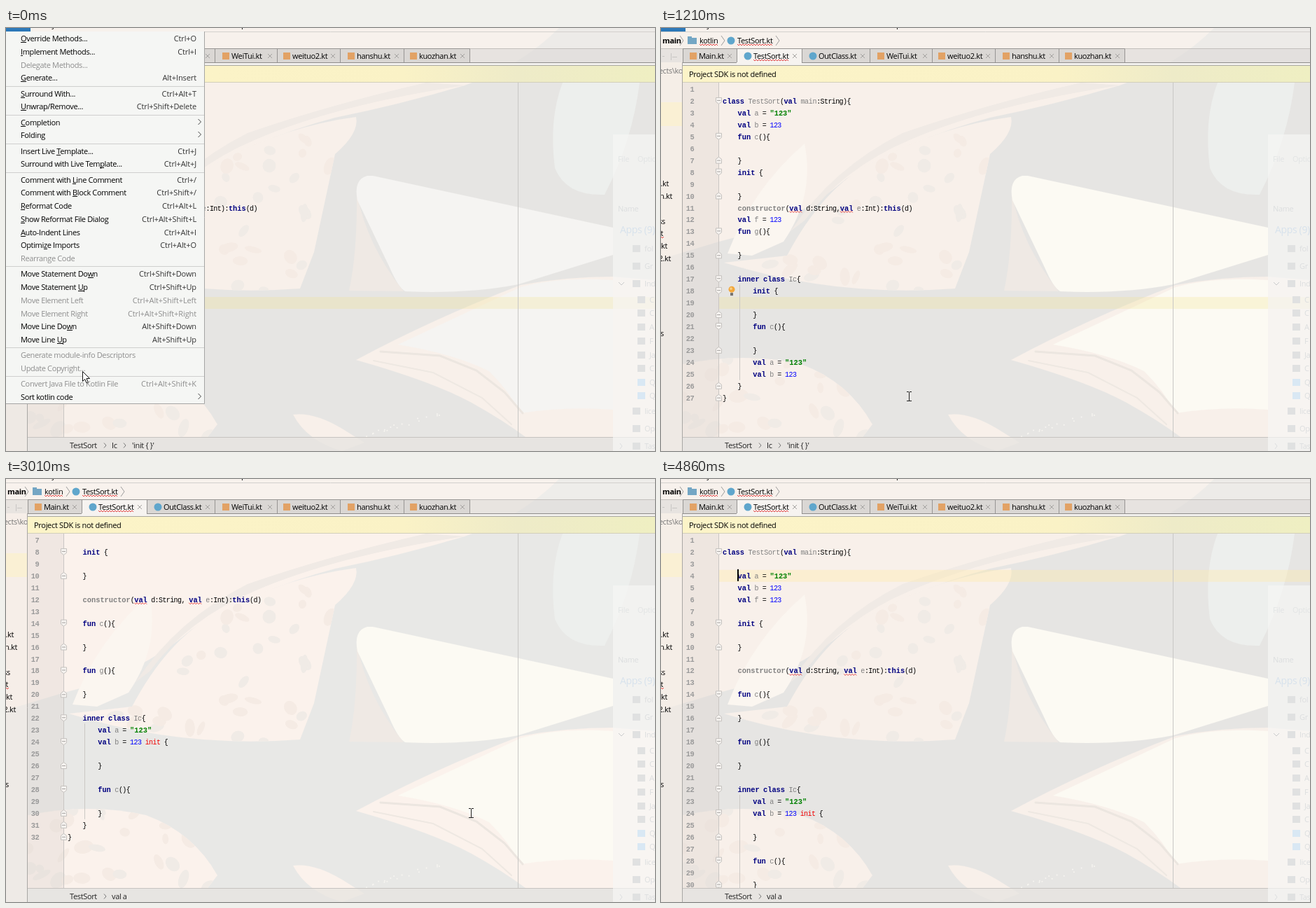
These frames come from a looping animation (927 px wide and 604 px high, 4960 ms). An HTML page with a canvas:

```html
<!DOCTYPE html>
<html lang="en">
<head>
<meta charset="utf-8">
<title>Sorting Kotlin code</title>
<style>
html, body { margin: 0; width: 100%; height: 100%; overflow: hidden; }
canvas { display: block; }
</style>
</head>
<body>
<canvas id="stage" width="927" height="604"></canvas>
<script>
const ctx = document.getElementById('stage').getContext('2d');
const LOOP = 4960;
const STEPS = [0, 130, 250, 370, 490, 610, 730, 850, 970, 1090, 1210, 1450, 1570, 1690, 1810, 1930,
  2050, 2170, 2290, 2410, 2540, 2650, 2770, 2890, 3010, 3380, 3880, 4000, 4120, 4240, 4360, 4860];
const SELECT = 250, CLOSE = 850, SORT = 1450, BULB = 2170, SCROLL = 2650, RESET = 3380;
const ROW = 16.95, TOP = 87;

// Pointer path: time, x, y
const PATH = [[0, 109, 490], [130, 109, 501], [250, 113, 518], [370, 150, 524], [490, 226, 526],
  [610, 298, 527], [730, 326, 527], [850, 332, 533], [1210, 354, 526], [1450, 390, 525],
  [1930, 650, 522], [2290, 705, 539], [2650, 690, 510], [3010, 664, 477], [3380, 678, 498],
  [3880, 678, 498], [4360, 816, 616], [4960, 816, 616]];

const BEFORE = `
class TestSort(val main:String){
    val a = "123"
    val b = 123
    fun c(){

    }
    init {

    }
    constructor(val d:String,val e:Int):this(d)
    val f = 123
    fun g(){

    }

    inner class Ic{
        init {

        }
        fun c(){

        }
        val a = "123"
        val b = 123
    }
}`.split('\n');

const AFTER = `
class TestSort(val main:String){

    val a = "123"
    val b = 123
    val f = 123

    init {

    }

    constructor(val d:String, val e:Int):this(d)

    fun c(){

    }

    fun g(){

    }

    inner class Ic{
        val a = "123"
        val b = 123 init {

        }

        fun c(){

        }
    }
}`.split('\n');

// "&" marks the mnemonic, a leading "-" a disabled entry
const MENU = [
  ['&Override Methods...|Ctrl+O', '&Implement Methods...|Ctrl+I', '-Delegate Methods...', '&Generate...|Alt+Insert'],
  ['&Surround With...|Ctrl+Alt+T', '&Unwrap/Remove...|Ctrl+Shift+Delete'],
  ['&Completion|>', 'Folding|>'],
  ['Insert Live &Template...|Ctrl+J', 'Surround with Live Tem&plate...|Ctrl+Alt+J'],
  ['Comment with &Line Comment|Ctrl+/', 'Comment with &Block Comment|Ctrl+Shift+/', '&Reformat Code|Ctrl+Alt+L',
    '&Show Reformat File Dialog|Ctrl+Alt+Shift+L', '&Auto-Indent Lines|Ctrl+Alt+I', 'Optimi&ze Imports|Ctrl+Alt+O', '-Rearrange Code'],
  ['Move Statement Do&wn|Ctrl+Shift+Down', 'Move Statement &Up|Ctrl+Shift+Up', '-Move Element Left|Ctrl+Alt+Shift+Left',
    '-Move Element Right|Ctrl+Alt+Shift+Right', 'Move Line Do&wn|Alt+Shift+Down', 'Move Line &Up|Alt+Shift+Up'],
  ['-Generate module-info Descriptors', '-Update Copyright...'],
  ['-Convert Java File to Kotlin File|Ctrl+Alt+Shift+K', 'Sort kotlin code|>']
];

function rect(x, y, w, h, color) {
  ctx.fillStyle = color;
  ctx.fillRect(x, y, w, h);
}

function line(color, width, ...pts) {
  ctx.strokeStyle = color;
  ctx.lineWidth = width;
  ctx.beginPath();
  for (let i = 0; i < pts.length; i += 2) ctx.lineTo(pts[i], pts[i + 1]);
  ctx.stroke();
}

function shape(color, path) {
  ctx.fillStyle = color;
  ctx.fill(new Path2D(path));
}

function dot(x, y, r, color) {
  ctx.fillStyle = color;
  ctx.beginPath();
  ctx.arc(x, y, r, 0, 7);
  ctx.fill();
}

function label(str, x, y, color = '#000', { size = 11, weight = '', gap = -0.35, align = 'left' } = {}) {
  ctx.font = `${weight} ${size}px "Open Sans", sans-serif`;
  ctx.letterSpacing = gap + 'px';
  ctx.textAlign = align;
  ctx.fillStyle = color;
  ctx.fillText(str, x, y + 4);
  return ctx.measureText(str).width;
}

function wave(x, y, w) {
  ctx.strokeStyle = '#e03030';
  ctx.lineWidth = 0.9;
  ctx.beginPath();
  for (let i = 0; i <= w; i += 2) ctx.lineTo(x + i, y + (i % 4 ? 1 : -1));
  ctx.stroke();
}

function chevron(x, y, w, h, color) {
  line(color, 1, x, y - h, x + w, y, x, y + h);
}

function seeded(seed) {
  return () => (seed = (seed * 16807) % 2147483647) / 2147483647;
}

const SPECKLED = 'M180 325Q230 230 300 192Q400 140 500 127Q505 150 470 180Q455 250 440 320L420 372Q250 385 90 335Z';
const CRUST = 'M31 480Q120 462 200 480Q268 505 302 566L288 584H31Z';

function speckle(path, x, y, w, h, count, seed) {
  const rnd = seeded(seed);
  ctx.save();
  ctx.clip(new Path2D(path));
  for (let i = 0; i < count; i++) {
    ctx.fillStyle = i % 2 ? '#f0ebe6' : '#f5ebe4';
    ctx.beginPath();
    ctx.ellipse(x + rnd() * w, y + rnd() * h, 5 + rnd() * 9, 4 + rnd() * 6, rnd() * 3, 0, 7);
    ctx.fill();
  }
  ctx.restore();
}

function wallpaper(t) {
  const warm = t >= CLOSE, scrolled = t >= SCROLL && t < RESET;
  const peach = scrolled ? '#fbf2ec' : '#f8f0ea';
  const cream = warm ? '#fcfaf3' : '#f5f4f2';
  rect(0, 0, 927, 604, scrolled ? '#e8e8e6' : '#e6e5e3');
  shape(peach, 'M0 0H790Q735 55 655 82Q560 110 470 128Q350 160 265 215Q190 280 83 305L0 330Z');
  shape('#f0eae5', 'M655 82Q470 110 355 160Q260 200 205 275L185 290Q245 200 345 150Q460 110 600 78Z');
  shape(peach, SPECKLED);
  speckle(SPECKLED, 90, 130, 410, 245, 60, 71);
  shape(warm ? '#fbf6f0' : '#f5f2ee', 'M95 322Q130 230 205 165Q220 240 175 305L130 325Z');
  shape(peach, CRUST);
  speckle(CRUST, 31, 470, 270, 115, 30, 19);
  shape('#edefed', 'M795 78H905Q895 160 855 238Q800 240 784 200Q775 130 795 78Z');
  shape('#efe9e4', 'M501 235Q515 310 568 376L490 375Q502 320 501 235Z');
  shape(cream, 'M524 211L867 285V324L732 366Q660 380 570 376Q560 370 548 342L502 246Q496 216 516 211Z');
  shape(peach, 'M867 355Q800 355 735 367Q610 415 500 474Q610 505 665 535Q710 560 742 584H927V360Z');
  shape(cream, 'M867 360Q790 355 735 370Q650 410 560 452Q640 465 690 490Q720 520 735 550Q800 540 867 545Z');
  ctx.lineCap = 'round';
  line('#ece6e0', 3, 535, 462, 620, 468, 672, 489, 712, 520, 738, 550);
  line('#eee8e2', 2, 525, 475, 610, 492, 680, 528, 722, 566);
  ctx.lineCap = 'butt';
  shape(peach, 'M410 552Q440 548 480 572L512 592L480 604Q430 590 410 552Z');
  const rnd = seeded(5);
  for (let i = 0; i < 18; i++) {
    const u = rnd();
    dot(515 + u * 110, 578 - u * 32 + rnd() * 8, 1, '#f7f5f1');
  }
}

function ghostWindow() {
  rect(867, 152, 60, 452, 'rgba(247,247,246,.7)');
  const faint = '#dcdedf';
  label('File', 874, 187, '#e2e4e4');
  label('Options', 902, 187, '#e2e4e4');
  label('Name', 874, 258, faint);
  label('Apps (9)', 877, 289, '#d7e2ec', { size: 14 });
  line('#c8cacb', 1, 875, 363, 879, 367, 883, 363);
  chevron(877, 597, 3, 4, faint);
  const rows = [[315, 'fol'], [340, 'Gr'], [365, 'Ind'], [388, 'C'], [407, 'C'], [427, 'A'], [447, 'F'],
    [467, 'Ja'], [486, 'C'], [506, 'Q'], [525, 'Q'], [547, 'lice'], [572, 'Op'], [597, 'Tas']];
  for (const [y, name] of rows) {
    const inner = y > 380 && y < 540;
    const color = y === 506 || y === 525 ? '#d9e8f4' : '#e0e1e1';
    rect(inner ? 902 : 895, y - 5, 11, 10, color);
    label(name, inner ? 919 : 912, y, faint);
  }
}

function tab(name, x, end, textX, kind) {
  const active = name === 'TestSort.kt';
  rect(x, 30, end - x, active ? 23 : 19, active ? '#f6f3f0' : '#dad7d4');
  line('#979593', 1, x + 0.5, 49, x + 0.5, 29.5, end + 0.5, 29.5, end + 0.5, 49);
  if (kind === 'class') dot(textX - 8, 40, 5.5, '#5fa6cc');
  else rect(textX - 13, 35, 10, 10, '#e2a265');
  const w = label(name, textX, 40);
  if (active) wave(textX, 46, w);
  line('#a3a19f', 1, end - 13, 37, end - 7, 43);
  line('#a3a19f', 1, end - 7, 37, end - 13, 43);
}

function frameTop(t) {
  rect(0, 0, 927, 29, 'rgba(244,241,237,.45)');
  const names = [['Analyze', 44], ['Refactor', 93], ['Build', 144], ['Run', 178], ['Tools', 209], ['VCS', 245], ['Window', 276], ['Help', 320]];
  for (const [name, x] of names) label(name, x, -5);
  if (t < SORT) {
    rect(0, 0, 35, 5, '#2c78b8');
    label('Code', 6, -4, '#fff');
  }
  line('#d3d0cd', 1, 0, 5.5, 927, 5.5);
  label('main', 2, 18, '#000', { weight: 'bold' });
  chevron(27, 18, 5, 7, '#9b9b9b');
  rect(38, 14, 13, 9, '#74a6c4');
  rect(38, 12, 6, 3, '#74a6c4');
  wave(55, 24, label('kotlin', 55, 18));
  chevron(86, 18, 5, 7, '#9b9b9b');
  dot(100, 18, 5.5, '#5fa6cc');
  wave(109, 24, label('TestSort.kt', 109, 18));
  chevron(164, 18, 5, 7, '#9b9b9b');

  rect(0, 29, 927, 20, 'rgba(226,223,220,.75)');
  line('#c2bfbc', 1, 0, 29.5, 927, 29.5);
  rect(31, 49, 896, 4, '#f3f1ee');
  line('#8f8d8b', 1, 31, 49.5, 927, 49.5);
  tab('Main.kt', 31, 108, 54);
  tab('OutClass.kt', 201, 298, 225, 'class');
  tab('WeiTui.kt', 298, 387, 322);
  tab('weituo2.kt', 387, 477, 409);
  tab('hanshu.kt', 477, 568, 501);
  tab('kuozhan.kt', 568, 662, 590);
  tab('TestSort.kt', 108, 201, 132, 'class');
  line('#a9a8a0', 1, 31, 53.5, 927, 53.5);
  const g = ctx.createLinearGradient(31, 0, 927, 0);
  g.addColorStop(0, '#fcf4c8');
  g.addColorStop(0.6, '#faf2c6');
  g.addColorStop(0.78, '#eeebc8');
  g.addColorStop(1, '#efefc2');
  rect(31, 54, 896, 23, g);
  line('#d2cfbb', 1, 31, 77.5, 927, 77.5);
  label('Project SDK is not defined', 40, 66, '#000', { gap: -0.3 });
}

function sidePanel() {
  rect(0, 49, 31, 555, 'rgba(243,237,231,.6)');
  rect(0, 106, 30, 34, '#faf0d4');
  line('#777', 1, 2, 40.5, 5, 40.5);
  line('#777', 1, 14.5, 36, 14.5, 46);
  line('#777', 1, 16, 41.5, 23, 41.5);
  label('ects\\ko', 31, 61, '#777', { align: 'right' });
  for (const [str, right, y] of [['.kt', 11, 222], ['n.kt', 16, 240], ['ss', 6, 276], ['rt', 3, 293], ['.kt', 9, 311], ['2.kt', 14, 329], ['s', 4, 436]])
    label(str, right, y, '#000', { align: 'right' });
  wave(0, 299, 4);
  line('#a9a7a4', 1, 30.5, 49, 30.5, 604);
}

// Draws monospaced text and returns the x where it ends
function mono(str, x, y, color, bold, pitch = bold ? 6.2 : 5.4) {
  const size = bold ? 10.4 : 10;
  ctx.font = `${bold ? 'bold' : ''} ${size}px "Liberation Mono", monospace`;
  ctx.letterSpacing = (pitch - size * 0.6) + 'px';
  ctx.textAlign = 'left';
  ctx.fillStyle = color;
  ctx.fillText(str, x, y + 4);
  return x + str.length * pitch;
}

function codeLine(str, y) {
  let x = 88;
  for (const token of str.match(/"[^"]*"|\w+|./g) || []) {
    const start = x, stray = token === 'init' && /123/.test(str);
    let color = '#000', bold = false, pitch;
    if (stray) color = '#f00000';
    else if (/^(class|val|fun|init|this|inner)$/.test(token)) [color, bold] = ['#000080', true];
    else if (token === 'constructor') [color, bold] = ['#808080', true];
    else if (token[0] === '"') [color, bold] = ['#008000', true];
    else if (/^\d/.test(token)) color = '#0000ff';
    else if (/^(TestSort|main|Ic|[abcefg])$/.test(token)) [color, pitch] = ['#808080', 5.7];
    x = mono(token, x, y, color, bold, pitch);
    if (token === 'val' && /constructor/.test(str)) wave(start, y + 6, 19);
  }
}

function foldMark(y, open) {
  const d = open ? 1 : -1;
  ctx.fillStyle = '#f6f3f0';
  ctx.beginPath();
  for (const [dx, dy] of [[-4, -4.5], [4, -4.5], [4, 1.5], [0, 4.5], [-4, 1.5]]) ctx.lineTo(82.5 + dx, y + dy * d);
  ctx.closePath();
  ctx.fill();
  ctx.strokeStyle = '#c4c1be';
  ctx.lineWidth = 1;
  ctx.stroke();
  line('#a5a2a0', 1, 80, y - d * 0.5, 85, y - d * 0.5);
}

function bulb(y) {
  dot(101, y - 2, 4.5, '#f2a73c');
  dot(100, y - 3, 1.8, '#f9cf85');
  rect(99, y + 3, 4, 4, '#77736e');
}

function editor(t) {
  const sorted = t >= SORT, code = sorted ? AFTER : BEFORE;
  const scroll = t >= SCROLL && t < RESET ? 6 * Math.min(1, (t - 2530) / 480) : 0;
  const rowY = n => TOP + (n - 1 - scroll) * ROW;
  ctx.save();
  ctx.beginPath();
  ctx.rect(31, 78, 896, 506);
  ctx.clip();
  rect(31, 78, 52, 506, 'rgba(222,214,207,.38)');
  const current = rowY(sorted ? 4 : 19);
  rect(83, current - 8, 844, 17, sorted ? 'rgba(255,232,165,.36)' : 'rgba(240,222,130,.25)');
  line('#c9c6c3', 1, 82.5, 78, 82.5, 584);
  line('#c8c7c5', 1, 731.5, 78, 731.5, 584);
  const inner = code.findIndex(s => s.includes('inner')) + 1;
  line('#cbc8c4', 1, 112.5, rowY(inner) + 8, 112.5, rowY(code.length - 1) - 8);
  code.forEach((str, i) => {
    const y = rowY(i + 1), num = String(i + 1);
    mono(num, 47 - num.length * 5.6, y, '#999', true, 5.6);
    if (/[{}]$/.test(str)) foldMark(y, str.endsWith('{'));
    codeLine(str, y);
  });
  if (!sorted) bulb(rowY(18));
  else if (t >= BULB && t < SCROLL) bulb(rowY(3));
  if (sorted && Math.floor((t - 3870) / 490) % 2 === 0) rect(109, current - 9, 2, 17, '#000');
  ctx.restore();

  rect(31, 584, 896, 20, 'rgba(231,228,225,.75)');
  line('#c6c3c0', 1, 31, 584.5, 927, 584.5);
  label('TestSort', 91, 596, '#222');
  chevron(140, 596, 3, 3.5, '#777');
  label(sorted ? 'val a' : 'Ic', 151, 596, '#222');
  if (!sorted) {
    chevron(168, 596, 3, 3.5, '#777');
    label("'init { }'", 180, 596, '#222');
  }
}

function menuText(str, x, y, color) {
  const at = str.indexOf('&'), plain = str.replace('&', '');
  label(plain, x, y, color);
  if (at < 0) return;
  const left = x + ctx.measureText(plain.slice(0, at)).width;
  rect(Math.round(left), y + 5, Math.round(ctx.measureText(plain[at]).width), 1, color);
}

function menu(t) {
  rect(0, 5, 283, 532, '#f5f6f4');
  line('#a5a5a4', 1, 0, 536.5, 283.5, 536.5, 283.5, 5);
  let index = 0;
  MENU.forEach((group, g) => group.forEach((entry, i) => {
    const y = Math.round(15 + index++ * 18.75 + g * 3.5);
    const off = entry[0] === '-';
    const [name, keys] = entry.replace(/^-/, '').split('|');
    const selected = name.startsWith('Sort') && t >= SELECT;
    if (g && !i) line('#cfcfce', 1, 0, y - 10.5, 283, y - 10.5);
    if (selected) rect(0, y - 10, 283, 19, '#2080c8');
    menuText(name, 21, y, selected ? '#fff' : off ? '#8e8e8e' : '#000');
    if (keys === '>') chevron(274.5, y - 1, 4, 4, selected ? '#fff' : '#444');
    else if (keys) label(keys, 272, y, off ? '#8e8e8e' : '#333', { gap: -0.1, align: 'right' });
  }));
  if (t < SELECT) return;
  rect(283, 515, 317, 20, '#f5f6f4');
  line('#999', 1, 283, 515.5, 599.5, 515.5, 599.5, 534.5, 283, 534.5);
  label('fields->initializer->constructors->functions', 302, 525);
  label('Ctrl+Alt+K', 589, 525, '#333', { gap: -0.1, align: 'right' });
}

function pointer(t) {
  const i = PATH.findIndex(p => p[0] > t);
  const [t0, x0, y0] = PATH[i - 1], [t1, x1, y1] = PATH[i];
  const u = (t - t0) / (t1 - t0);
  ctx.save();
  ctx.translate(Math.round(x0 + (x1 - x0) * u), Math.round(y0 + (y1 - y0) * u));
  if (t < CLOSE) {
    const arrow = new Path2D('M.5 .5V14.5L3.7 11.4L6 16.8L8.3 15.8L6 10.5H10.5Z');
    ctx.fillStyle = '#fff';
    ctx.fill(arrow);
    ctx.strokeStyle = '#111';
    ctx.lineWidth = 1;
    ctx.stroke(arrow);
  } else {
    rect(0, -6, 1, 13, '#222');
    for (const y of [-7, 6]) {
      rect(-3, y, 3, 1, '#222');
      rect(1, y, 3, 1, '#222');
    }
  }
  ctx.restore();
}

function draw(t) {
  wallpaper(t);
  sidePanel();
  editor(t);
  ghostWindow();
  frameTop(t);
  if (t < CLOSE) menu(t);
  pointer(t);
}

let shown = -1;
function tick() {
  const now = performance.now() % LOOP;
  const step = STEPS.findLast(s => s <= now);
  if (step !== shown) draw(shown = step);
  requestAnimationFrame(tick);
}
tick();
</script>
</body>
</html>
```
